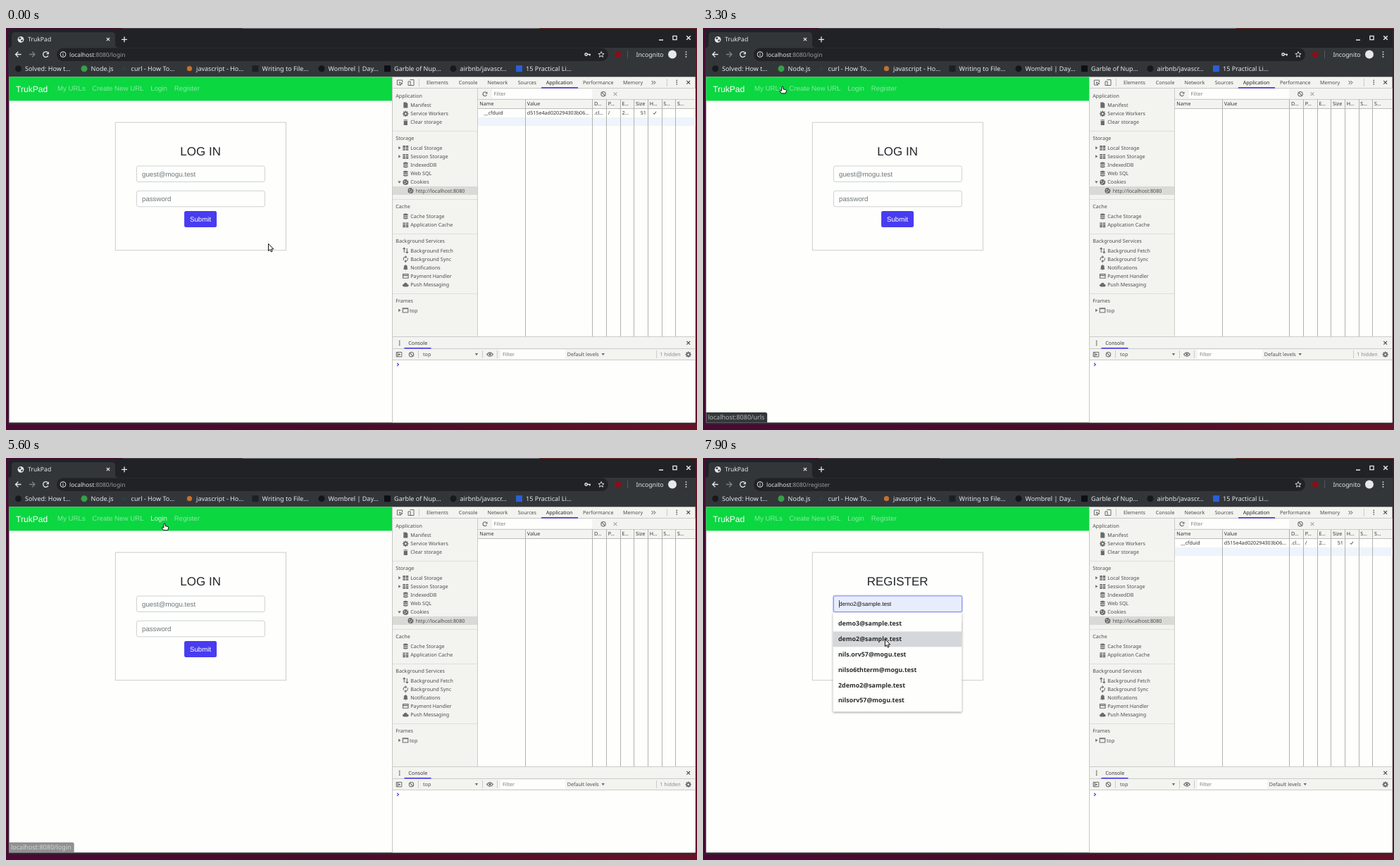
Recreate the animation shown at these times as an HTML page with a canvas. Size 981 by 571 pixels, loop 8 s.

```html
<!DOCTYPE html>
<html lang="en">
<head>
<meta charset="utf-8">
<title>TrukPad</title>
<style>
html, body { margin: 0; width: 100%; height: 100%; overflow: hidden; background: #2c0a1e; }
canvas { display: block; width: 981px; height: 571px; }
</style>
</head>
<body>
<canvas id="stage"></canvas>
<script>
const W = 981, H = 571, LOOP = 8000;
const canvas = document.getElementById('stage');
const dpr = window.devicePixelRatio || 1;
canvas.width = W * dpr;
canvas.height = H * dpr;
const c = canvas.getContext('2d');

const UI = '"Noto Sans", sans-serif';
const PAGE = '"Liberation Sans", Arial, sans-serif';
const APP = 'TrukPad', HOST = 'localhost', PORT = ':8080/';
const PAPER = '#fefefc', PANEL = '#f3f3f0', LINE = '#cbcbc9', INK = '#4c4c4c';
const ICON = '#6b6b6b', BLUE = '#483cf0', BAR = '#333639', DARK = '#202226', LIGHT = '#e6e8ea';

// Edges of the web content and the lower edge of its navigation bar
const LEFT = 4.4, TOP = 69.4, RIGHT = 978.6, BOTTOM = 560.4, NAV_END = 103.4;

// ---------- drawing helpers ----------
function rect(x, y, w, h, color) {
  c.fillStyle = color;
  c.fillRect(x, y, w, h);
}
function round(x, y, w, h, r, fill, stroke, width = 1) {
  c.beginPath();
  c.roundRect(x, y, w, h, r);
  if (fill) { c.fillStyle = fill; c.fill(); }
  if (stroke) { c.strokeStyle = stroke; c.lineWidth = width; c.stroke(); }
}
function dot(x, y, r, color) {
  c.beginPath();
  c.arc(x, y, r, 0, 7);
  c.fillStyle = color;
  c.fill();
}
function arc(x, y, r, from, to, color, width = 1) {
  c.beginPath();
  c.arc(x, y, r, from, to);
  c.strokeStyle = color;
  c.lineWidth = width;
  c.stroke();
}
function path(d, x, y, stroke, fill, width = 1) {
  const p = new Path2D(d);
  c.save();
  c.translate(x, y);
  if (fill) { c.fillStyle = fill; c.fill(p); }
  if (stroke) { c.strokeStyle = stroke; c.lineWidth = width; c.stroke(p); }
  c.restore();
}
// y is the middle of the capitals
function text(s, x, y, size, color, { font = UI, align = 'left', weight = 400 } = {}) {
  c.font = `${weight} ${size}px ${font}`;
  c.textAlign = align;
  c.fillStyle = color;
  c.fillText(s, x, y + size * 0.36);
  return c.measureText(s).width;
}
const small = (s, x, y, color = INK, opt) => text(s, x, y, 7.15, color, opt);
const cross = (x, y, r, color, w = 1.2) =>
  path(`M${-r} ${-r}L${r} ${r}M${r} ${-r}L${-r} ${r}`, x, y, color, null, w);
const hline = (x, y, w, color = LINE) => rect(x, y, w, 1, color);
const vline = (x, y, h, color = LINE) => rect(x, y, 1, h, color);
function dots(x, y, step, color) {
  for (let i = -1; i < 2; i++) dot(x, y + i * step, 0.95, color);
}
function reload(x, y, r, color, width) {
  arc(x, y, r, 0.5, 5.5, color, width);
  path(`M${r + 0.6} ${-r - 0.3}V-.2H.4Z`, x, y, null, color);
}
function ban(x, y, color) {
  arc(x, y, 3.2, 0, 7, color, 1.1);
  path('M-2.2 -2.2L2.2 2.2', x, y, color, null, 1.1);
}

// Icons drawn around their own centre: [path, filled]
const ICONS = {
  doc: ['M-3 -4H1L3 -2V4H-3Z', 1],
  trash: ['M-3 -3.4H-1.2L-.8 -4H.8L1.2 -3.4H3V-2.6H-3ZM-2.6 -2H2.6V4H-2.6Z', 1],
  grid: ['M-4 -3.2H-.4V-1.4H-4ZM.4 -3.2H4V-1.4H.4ZM-4 -.8H-.4V1H-4ZM.4 -.8H4V1H.4ZM-4 1.6H-.4V3.4H-4ZM.4 1.6H4V3.4H.4Z', 1],
  db: ['M-3.3 -3Q0 -5 3.3 -3V-1.8Q0 -.4 -3.3 -1.8ZM-3.3 -1Q0 .6 3.3 -1V.5Q0 2 -3.3 .5ZM-3.3 1.4Q0 3 3.3 1.4V3Q0 5 -3.3 3Z', 1],
  updown: ['M-2 3V-3.6M-3.8 -1.8L-2 -3.8L-.2 -1.8M2 -3V3.6M.2 1.8L2 3.8L3.8 1.8', 0],
  sync: ['M-2.8 1.6A3.2 3.2 0 0 1 .8 -3M2.8 -1.6A3.2 3.2 0 0 1 -.8 3M-.6 -4.6L1.2 -3L-.6 -1.4M.6 4.6L-1.2 3L.6 1.4', 0],
  bell: ['M-3.4 2.6L-2.5 1.6V-1Q-2.4 -3.2 -.6 -3.6Q0 -4.6 .6 -3.6Q2.4 -3.2 2.5 -1V1.6L3.4 2.6ZM-1 3.1H1Q0 4.6 -1 3.1Z', 1],
  card: ['M-3.8 -2.8H3.8V2.8H-3.8ZM-3.8 -.8H3.8', 0],
  cloud: ['M-2.4 2.8Q-4.6 2.6 -4.4 .6Q-4 -.9 -2.6 -.9Q-1.8 -3 0 -2.9Q2 -2.8 2.5 -.7Q4.5 -.5 4.5 1.1Q4.3 2.8 2.5 2.8Z', 1],
  frame: ['M-3.8 -3H3.8V3H-3.8ZM-3.8 -2.2H3.8', 0]
};
function icon(name, x, y) {
  if (name === 'gear') {
    for (let i = 0; i < 4; i++) {
      const a = i * Math.PI / 4, u = Math.cos(a) * 4.2, v = Math.sin(a) * 4.2;
      path(`M${-u} ${-v}L${u} ${v}`, x, y, ICON, null, 1.5);
    }
    dot(x, y, 3.1, ICON);
    dot(x, y, 1.3, PANEL);
  } else if (name === 'cookie') {
    dot(x, y, 4, ICON);
    [[-1.5, -1.2], [1.3, 0.2], [-0.8, 1.9], [2.4, -2.6]].forEach(p => dot(x + p[0], y + p[1], 0.8, PANEL));
  } else {
    const [d, filled] = ICONS[name];
    path(d, x, y, filled ? null : ICON, filled ? ICON : null, 1.1);
  }
}

// ---------- timeline ----------
const BASE = { load: 0, loc: 0, key: 1, hid: 1, row: 1, hov: -1, st: '', fade: 1, reg: 0, focus: 0, menu: 0 };
const STEPS = [
  [1500, { load: 1, key: 0 }],
  [1600, { load: 0, key: 1, hid: 0 }],
  [1800, { hid: 1 }],
  [2200, { hov: 2, st: 'login' }],
  [2400, { hov: 0, st: 'urls' }],
  [2900, { load: 1, key: 0 }],
  [3000, { loc: 1, key: 1, hov: -1 }],
  [3200, { load: 0, loc: 0, row: 0 }],
  [3400, { row: 1, hov: 1, st: 'urls/new' }],
  [4000, { load: 1, key: 0 }],
  [4100, { loc: 1, key: 1, hov: -1 }],
  [4200, { row: 0 }],
  [4400, { load: 0, loc: 0, row: 1 }],
  [4500, { hov: 2, st: 'login' }],
  [5100, { load: 1, key: 0 }],
  [5200, { loc: 1, key: 1, hov: -1, row: 0 }],
  [5300, { hid: 0 }],
  [5500, { load: 0, loc: 0, hid: 1, hov: 2 }],
  [5600, { fade: 0.55 }],
  [5700, { hov: 3, st: 'register', fade: 1, row: 1 }],
  [6300, { load: 1, key: 0 }],
  [6400, { loc: 1, reg: 1, row: 0, hid: 0, hov: -1, fade: 0.55 }],
  [6500, { load: 0, loc: 0, st: '' }],
  [6700, { row: 1 }],
  [7300, { focus: 1 }],
  [7400, { menu: 1 }]
];
// time, x, y of the pointer
const TRACK = [
  [500, 372, 306], [600, 343, 230], [700, 362, 141], [900, 420, 200], [1700, 420, 200],
  [2200, 211, 84], [2300, 211, 84], [2400, 112, 85], [2500, 92, 81], [3200, 92, 81],
  [3600, 175, 90], [4400, 175, 90], [4500, 194, 95], [4600, 194, 95], [4700, 222, 92.5],
  [5500, 222, 92.5], [5600, 225, 93], [5800, 256, 90], [6400, 256, 90], [7000, 256, 200],
  [7400, 256, 200], [7900, 258, 257]
];
function stateAt(t) {
  const s = { ...BASE };
  for (const [at, change] of STEPS) if (t >= at) Object.assign(s, change);
  return s;
}
function pointerAt(t) {
  const i = TRACK.findIndex(k => k[0] > t);
  if (i === 0) return TRACK[0].slice(1);
  if (i < 0) return TRACK[TRACK.length - 1].slice(1);
  const a = TRACK[i - 1], b = TRACK[i], f = (t - a[0]) / (b[0] - a[0]);
  return [a[1] + (b[1] - a[1]) * f, a[2] + (b[2] - a[2]) * f];
}

// ---------- browser ----------
function desktop() {
  const g = c.createLinearGradient(0, 0, W, 0);
  g.addColorStop(0, '#4a0a34');
  g.addColorStop(0.5, '#4c0a2a');
  g.addColorStop(1, '#6c1026');
  rect(0, 0, W, H, g);
  rect(165, 0, 171, 1, '#4c4248');
  rect(336, 0, 421, 1, '#77777a');
  rect(757, 0, 224, 1, '#6d2b26');
  rect(3.4, 1, RIGHT - 2.6, 562, '#2b2c2e');
}

function tabStrip(s) {
  rect(3.4, 1, RIGHT - 2.6, 27, DARK);
  path('M3 28Q8 28 8 23V11Q8 6 13 6H150Q155 6 155 11V23Q155 28 160 28Z', 0, 0, null, BAR);
  if (s.load) {
    if (s.loc) arc(21, 16.5, 4.3, -1.5, -0.5, LIGHT, 1);
    else dot(20.5, 12.5, 0.7, LIGHT);
  } else {
    dot(21, 16.3, 4.4, LIGHT);
    path('M-3 -2Q-1 -4 .5 -2Q0 0 -2 0ZM0 .8L3 0Q3.4 2 1.4 3.4Z', 21, 16.3, null, BAR);
  }
  text(s.loc ? HOST + PORT + 'login' : APP, 31, 16.3, 8.65, LIGHT);
  cross(145, 16, 2.2, LIGHT);
  path('M-4 0H4M0 -4V4', 168, 16.3, LIGHT, null, 1.3);
  path('M-3 3H3', 930, 14, LIGHT, null, 1.5);
  path('M-2.6 -2.6H2.6V2.6H-2.6Z', 949.5, 14, LIGHT, null, 1.3);
  cross(969, 14, 2.8, LIGHT, 1.5);
}

function toolbar(s) {
  rect(3.4, 28, RIGHT - 2.6, TOP - 28, BAR);
  round(72, 28.5, 783, 18.5, 9, DARK);
  path('M4 0H-4M-.2 -3.8L-4 0L-.2 3.8', 17.5, 37.5, LIGHT, null, 1.3);
  path('M-4 0H4M.2 -3.8L4 0L.2 3.8', 37, 37.5, '#7c7f83', null, 1.3);
  if (s.load) cross(56.5, 37.5, 3.2, LIGHT, 1.4);
  else reload(56.5, 37.5, 3.8, LIGHT, 1.3);
  arc(81, 37.5, 3.9, 0, 7, LIGHT, 1);
  path('M0 -2.2V-1M0 -.3V2.2', 81, 37.5, LIGHT, null, 1);
  const w = text(HOST, 90, 37.5, 8.35, LIGHT);
  text(PORT + (s.reg ? 'register' : 'login'), 90 + w, 37.5, 8.35, '#9aa0a6');
  if (s.key) {
    arc(823.6, 37.5, 1.7, 0, 7, LIGHT, 1.4);
    path('M0 0H4.6M3.4 0V2', 825.4, 37.5, LIGHT, null, 1.4);
  }
  let star = '';
  for (let i = 0; i < 10; i++) {
    const a = i * Math.PI / 5 - Math.PI / 2, r = i % 2 ? 1.9 : 4.3;
    star += (i ? 'L' : 'M') + Math.cos(a) * r + ' ' + Math.sin(a) * r;
  }
  path(star + 'Z', 845, 37.8, LIGHT, null, 0.9);
  dot(869, 37.5, 4.3, '#8c0d18');
  vline(882, 32, 11, '#55585c');
  text('Incognito', 894.5, 37.5, 8.7, LIGHT);
  dot(946, 37.5, 6, LIGHT);
  dots(965.5, 37.5, 3.4, LIGHT);

  // x, label, mark colour, square mark, mark radius
  [[17.5, 'Solved: How t…', '#17191b'], [111, 'Node.js', '#36a048'], [168, 'curl - How To…', '#24414f', 0, 2.5],
   [260.5, 'javascript - Ho…', '#c4702e', 0, 3.6], [354, 'Writing to File…', '#1c2024', 1],
   [448, 'Wombrel | Day…', '#131517'], [541.5, 'Garble of Nup…', '#0d0e16', 1],
   [635, 'airbnb/javascr…', '#17191b'], [728.5, '15 Practical Li…', '#2b5fd6', 1]
  ].forEach(([x, label, color, square, r = 4.5]) => {
    if (square) rect(x - r, 57.7 - r, 2 * r, 2 * r, color);
    else dot(x, 57.7, r, color);
    text(label, x + 9.6, 57.7, 9, LIGHT);
  });
}

// ---------- page ----------
function field(y, label, s, first) {
  const active = first && s.menu;
  const filled = active && s.pick >= 0;
  if (active) round(183.9, y - 1.1, 185, 25.4, 3.4, '#c6caf9');
  round(185.5, y + 0.5, 182, 22.5, 2.5, filled ? '#e8edfd' : PAPER, active ? '#9397f0' : '#ced2d6');
  if (filled) text(MAILS[s.pick], 193, y + 12, 8.1, '#111', { font: PAGE });
  else text(label, 193, y + 11.7, 9.7, '#6c757d', { font: PAGE });
  if (first && s.focus) rect(193, y + 6.5, 0.8, 10.5, '#222');
}

const MAILS = ['demo3@sample.test', 'demo2@sample.test', 'nils.orv57@mogu.test',
  'nilso6thterm@mogu.test', '2demo2@sample.test', 'nilsorv57@mogu.test'];
const MENU_TOP = 224.6, MENU_ROW = 21.85;

function menu(pick) {
  c.save();
  c.shadowColor = 'rgba(0,0,0,.4)';
  c.shadowBlur = 3 * dpr;
  c.shadowOffsetY = dpr;
  round(184.5, 219.5, 183, 141, 1.5, PAPER);
  c.restore();
  if (pick >= 0) rect(184.5, MENU_TOP + pick * MENU_ROW, 183, MENU_ROW, '#d6d7da');
  MAILS.forEach((m, i) => text(m, 192, MENU_TOP + 10.4 + i * MENU_ROW, 8.9, '#2a2a2c', { weight: 600 }));
}

function status(s) {
  const label = HOST + PORT + s.st;
  c.font = `9px ${UI}`;
  const w = c.measureText(label).width + 6.5;
  const bubble = color => round(LEFT, 546, w, BOTTOM - 546, [0, 2.5, 0, 0], color);
  bubble('#34373a');
  text(label, 7, 553, 9, '#b4b7ba');
  c.globalAlpha = 1 - s.fade;
  bubble(PAPER);
  c.globalAlpha = 1;
}

function page(s) {
  rect(LEFT, TOP, 548 - LEFT, BOTTOM - TOP, PAPER);
  rect(LEFT, TOP, 548 - LEFT, NAV_END - TOP, '#0bd741');
  text(APP, 14, 86.3, 12.1, '#fff', { font: PAGE });
  [[73, 'My URLs'], [122.3, 'Create New URL'], [205.3, 'Login'], [238.8, 'Register']].forEach(([x, label], i) =>
    text(label, x, 86, 9.7, `rgba(255,255,255,${i === s.hov ? 0.8 : 0.5})`, { font: PAGE }));

  c.strokeStyle = '#cdced0';
  c.lineWidth = 1;
  c.strokeRect(155.3, 134.1, 242.2, 181.6);
  const mid = { font: PAGE, align: 'center' };
  text(s.reg ? 'REGISTER' : 'LOG IN', 276.1, 174.8, 17, '#212529', mid);
  field(195.5, 'guest@mogu.test', s, true);
  field(230.8, 'password', s, false);
  const w = s.reg ? 51.8 : 46;
  round(276.1 - w / 2, 260, w, 23, 2.5, BLUE);
  text(s.reg ? 'Register' : 'Submit', 276.1, 271.5, 9.7, '#fff', mid);
  if (s.menu) menu(s.pick);
  if (s.st) status(s);
}

// ---------- developer tools ----------
function sidebar() {
  [[96, 'Application'], [156.5, 'Storage'], [253.7, 'Cache'], [302.2, 'Background Services'], [387.3, 'Frames']]
    .forEach(([y, label]) => small(label, 553.3, y));
  [146, 243, 292, 377].forEach(y => hline(549, y, 120, '#dededb'));
  rect(549, 225, 120, 12, '#d9d9d6');
  const group = (y, items) => items.forEach(([kind, label], i) => {
    icon(kind, 567.3, y + i * 12.15);
    small(label, 574.3, y + i * 12.15);
  });
  group(109.6, [['doc', 'Manifest'], ['gear', 'Service Workers'], ['trash', 'Clear storage']]);
  group(170.3, [['grid', 'Local Storage'], ['grid', 'Session Storage'], ['db', 'IndexedDB'], ['db', 'Web SQL'], ['cookie', 'Cookies']]);
  group(267.6, [['db', 'Cache Storage'], ['grid', 'Application Cache']]);
  group(316, [['updown', 'Background Fetch'], ['sync', 'Background Sync'], ['bell', 'Notifications'], ['card', 'Payment Handler'], ['cloud', 'Push Messaging']]);
  icon('cookie', 574.5, 231);
  small('http://' + 'localhost:8080', 581.7, 231);
  icon('frame', 567, 401);
  small('top', 573, 401);
  [170.3, 182.4, 401].forEach(y => path('M-1.3 -2.2L2 0L-1.3 2.2Z', 558.5, y, null, ICON));
  path('M-2.2 -1.3H2.2L0 2Z', 558.5, 218.8, null, ICON);
}

function cookieTable(s) {
  const w = RIGHT - 670;
  rect(670, 86, w, 15, PANEL);
  reload(680, 93.7, 2.9, ICON, 1.1);
  rect(690, 87, 142, 13, PAPER);
  small('Filter', 692.5, 93.8, '#7c7c7c');
  ban(848, 93.7, ICON);
  cross(865, 93.7, 2.4, '#aaa');
  rect(670, 101, w, 14, PANEL);
  rect(670, 115, w, 323, PAPER);
  if (s.row) rect(670, 127, w, 12, '#eef4fc');
  hline(670, 101, w);
  hline(670, 114, w, '#bdbdbb');
  const heads = ['Name', 'Value', 'D…', 'P…', 'E…', 'Size', 'H…', 'S…', 'S…'];
  const left = i => i < 2 ? [669.5, 737][i] : 832.3 + (i - 2) * 19.65;
  heads.forEach((h, i) => {
    if (i) vline(Math.round(left(i)), 101, 337, '#b2b2b0');
    small(h, left(i) + 2.8, 107.8, '#333');
  });
  if (!s.row) return;
  const cells = ['', 'd515e4ad020294303b06…', '.cl…', '/', '2…'];
  small('__cfduid', 678.3, 120.7, '#333');
  cells.forEach((v, i) => small(v, left(i) + 2.8, 120.7, '#333'));
  small('51', 908.8, 120.7, '#333', { align: 'right' });
  path('M-2 .2L-.6 1.8L2 -2', 921, 120.7, '#333', null, 0.9);
}

function consolePanel(s) {
  const w = RIGHT - 549;
  rect(549, 438, w, 34, PANEL);
  [438, 455, 471].forEach(y => hline(549, y, w));
  dots(558.7, 447.5, 2.8, ICON);
  small('Console', 571.3, 447.5, '#333');
  rect(565.5, 454, 38, 1.6, BLUE);
  cross(968.7, 447.3, 2.4, INK);
  path('M-3.8 -3.2H3.8V3.2H-3.8ZM-2 -3.2V3.2', 558, 463.7, ICON, null, 1);
  path('M-.8 -1.8L2.4 0L-.8 1.8Z', 558, 463.7, null, ICON);
  ban(575.5, 463.7, ICON);
  [585, 676, 697].forEach(x => vline(x, 458, 11));
  small('top', 592, 463.8);
  const down = 'M-2.2 -1.6H2.2L0 1.8Z';
  path(down, 668, 463.5, null, ICON);
  path('M-4.4 0Q0 -5.6 4.4 0Q0 5.6 -4.4 0Z', 687, 463.7, ICON, null, 1.1);
  dot(687, 463.7, 1.6, ICON);
  const x = s.hid ? 796.7 : 803.8;
  rect(702, 457, x - 704.5, 13, PAPER);
  small('Filter', 705, 463.8, '#7c7c7c');
  small('Default levels', x, 463.8);
  path(down, x + 51, 463.5, null, ICON);
  if (s.hid) {
    vline(923, 458, 11);
    small('1 hidden', 928.3, 463.8, '#8a8a8a');
  }
  icon('gear', 968.7, 463.7);
  rect(549, 472, w, BOTTOM - 472, PAPER);
  path('M-1.2 -2L1.2 0L-1.2 2', 556.3, 478, BLUE, null, 1.1);
}

function devtools(s) {
  rect(548, TOP, RIGHT - 548, BOTTOM - TOP, PANEL);
  vline(548, TOP, BOTTOM - TOP, '#c6c6c4');
  path('M3.6 0V-3.4H-3.6V3.4H0M-.6 -.6L4 1.6L1.8 2.2L1 4.2Z', 559, 77.5, ICON, null, 1);
  path('M-1.5 -4H4V4H-1M-4 -1.6H-.8V4H-4Z', 575, 77.5, ICON, null, 1);
  vline(586, 72, 11);
  [[597, 'Elements'], [642.7, 'Console'], [683.5, 'Network'], [726.7, 'Sources'], [766.8, 'Application'], [819, 'Performance'], [876, 'Memory']]
    .forEach(([x, label]) => small(label, x, 77.5, label === 'Application' ? '#222' : INK));
  path('M-2.6 -2.4L-.2 0L-2.6 2.4M.4 -2.4L2.8 0L.4 2.4', 919.2, 77.5, INK, null, 1);
  vline(938, 72, 11);
  dots(952.3, 77.3, 2.8, ICON);
  cross(968.7, 77.3, 2.4, INK);
  hline(549, 85, RIGHT - 549);
  rect(760, 84, 52, 1.7, BLUE);
  sidebar();
  vline(669, 86, 352);
  cookieTable(s);
  consolePanel(s);
}

// ---------- pointer ----------
const HAND = 'M-1.1 .6Q0 -.6 1.1 .6V3.6L4.9 4.4Q5.9 4.9 5.6 6.2L4.8 9.6H-1.4L-3.9 6Q-3.4 4.8 -1.1 6Z';
const ARROW = 'M.5 .5V10.6L2.8 8.6L4.4 12L6.1 11.2L4.6 8H7.8Z';
const BEAM = 'M-2.3 -5H-.6L0 -4.4L.6 -5H2.3M0 -4.4V4.4M-2.3 5H-.6L0 4.4L.6 5H2.3';

function pointer(x, y) {
  if (y < 102) path(HAND, x, y, '#111', '#fff', 1);
  else if (x > 186 && x < 367 && y > 196 && y < 219) {
    path(BEAM, x, y + 0.5, '#fff', null, 2.4);
    path(BEAM, x, y + 0.5, '#222', null, 1.2);
  } else path(ARROW, x, y, '#111', '#fff', 1);
}

function draw(now) {
  const t = Math.floor(now % LOOP / 100) * 100;
  const s = stateAt(t), [x, y] = pointerAt(t);
  s.pick = s.menu ? Math.max(-1, Math.floor((y - MENU_TOP) / MENU_ROW)) : -1;
  c.setTransform(dpr, 0, 0, dpr, 0, 0);
  c.textRendering = 'geometricPrecision';
  desktop();
  tabStrip(s);
  toolbar(s);
  page(s);
  devtools(s);
  pointer(x, y);
}

let start;
function tick(now) {
  start ??= now;
  draw(now - start);
  requestAnimationFrame(tick);
}
draw(0);
requestAnimationFrame(tick);
</script>
</body>
</html>
```
